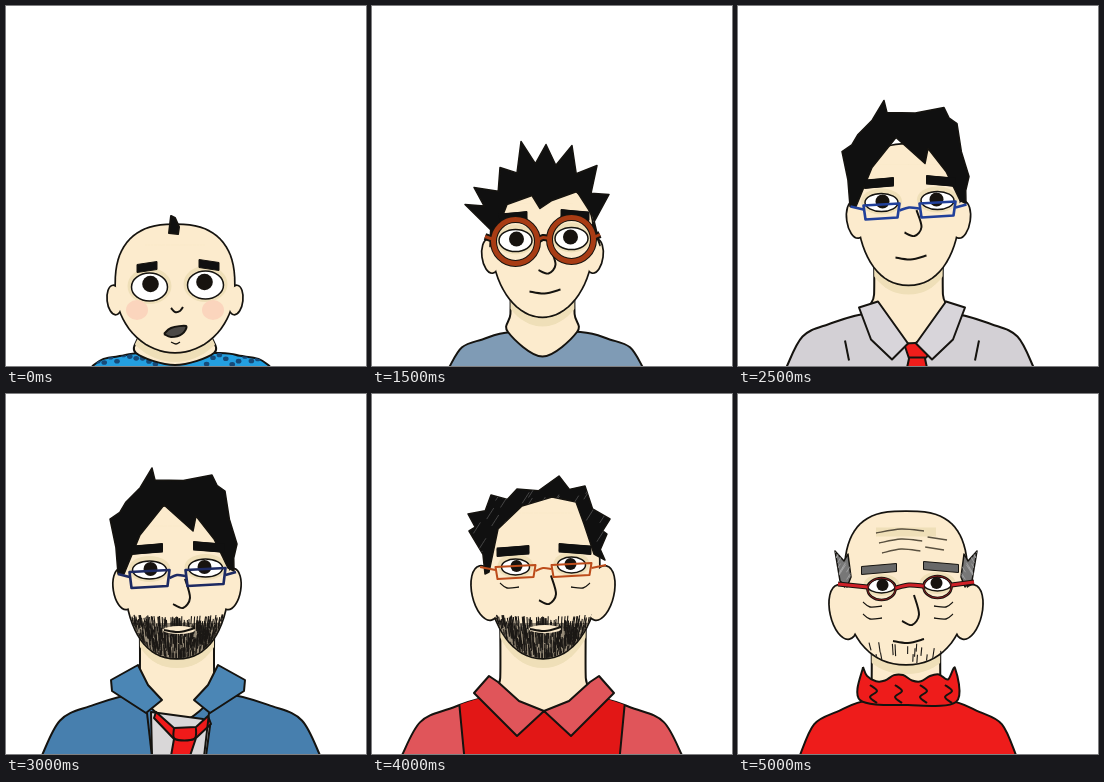
These frames come from a looping animation (360x360 px, 5.5 s). An HTML page with a canvas:

```html
<!DOCTYPE html>
<html lang="en">
<head>
<meta charset="utf-8">
<title>Growing older</title>
<style>
html, body { margin: 0; width: 100%; height: 100%; overflow: hidden; background: #fff; }
canvas { display: block; width: 100vw; height: 100vh; }
</style>
</head>
<body>
<canvas id="stage" width="360" height="360"></canvas>
<script>
const ctx = document.getElementById('stage').getContext('2d');
const INK = '#15130f', SKIN = '#fcebcd', SHADE = '#efdfb8', BLACK = '#101010';
const STEP = 500, SIDES = [-1, 1];

const points = t => typeof t === 'string' ? t.split(' ').map(s => s.split(',').map(Number)) : t;
const lerp = (a, b, t) => a + (b - a) * t;
const rng = seed => () => (seed = seed * 16807 % 2147483647) / 2147483647;

function poly(t, closed = true) {
  const path = new Path2D();
  points(t).forEach(p => path.lineTo(...p));
  if (closed) path.closePath();
  return path;
}

// Smooth open curve through the points
function curve(t) {
  const p = points(t), path = new Path2D();
  const at = i => p[Math.max(0, Math.min(p.length - 1, i))];
  path.moveTo(...p[0]);
  for (let i = 0; i < p.length - 1; i++) {
    const [a, b, c, d] = [at(i - 1), at(i), at(i + 1), at(i + 2)];
    path.bezierCurveTo(b[0] + (c[0] - a[0]) / 6, b[1] + (c[1] - a[1]) / 6,
      c[0] - (d[0] - b[0]) / 6, c[1] - (d[1] - b[1]) / 6, ...c);
  }
  return path;
}

function oval(x, y, rx, ry, turn = 0) {
  const path = new Path2D();
  path.ellipse(x, y, rx, ry, turn, 0, Math.PI * 2);
  return path;
}

function ink(path, color = INK, width = 2) {
  ctx.strokeStyle = color;
  ctx.lineWidth = width;
  ctx.stroke(path);
}

function fill(path, color) {
  ctx.fillStyle = color;
  ctx.fill(path);
}

function paint(path, color, width) {
  fill(path, color);
  ink(path, INK, width);
}

function local(x, y, fn, sx = 1) {
  ctx.save();
  ctx.translate(x, y);
  ctx.scale(sx, 1);
  fn();
  ctx.restore();
}

const mirror = (x, y, fn) => SIDES.forEach(s => local(x, y, fn, s));

function inside(path, fn) {
  ctx.save();
  ctx.clip(path);
  fn();
  ctx.restore();
}

// Head outline: two half superellipses meeting at eye level
function facePath(a) {
  const pts = [];
  for (let i = 0; i < 72; i++) {
    const c = Math.cos(i * Math.PI / 36), s = Math.sin(i * Math.PI / 36);
    const k = 2 / (s < 0 ? a.crown : a.jaw), h = s < 0 ? a.eye - a.top : a.chin - a.eye;
    pts.push([a.cx + a.w * Math.sign(c) * Math.abs(c) ** k, a.eye + h * Math.sign(s) * Math.abs(s) ** k]);
  }
  return poly(pts);
}

function bodyPath(a) {
  const edge = [[a.span, 1.02], [a.span * 0.87, 0.45], [a.span * 0.66, 0.22], [a.neck, 0]];
  const half = s => edge.map(([x, t]) => [a.bx + s * x, lerp(a.base, 360, t)]);
  return curve([...half(-1), ...half(1).reverse()]);
}

function neckPath(a) {
  const side = s => [[0.93, a.chin - 35], [0.93, a.base - 18], [1, a.base]].map(([k, y]) => [a.cx + s * k * a.neck, y]);
  return curve([...side(-1), [a.cx, a.base + a.dip], ...side(1).reverse()]);
}

// Clothes
const tie = a => local(a.bx + 4, a.base, () => {
  paint(poly('-10,31 14,30 18,39 11,46 14,60 -8,60 -5,46'), '#f01d1b');
  ink(curve('-5,45 11,45'));
});

const sleeves = (a, color) => inside(bodyPath(a), () => local(a.bx, 0, () => {
  const x = a.span * 0.61, y = a.span * 0.55;
  paint(poly([[-x, a.base - 20], [x, a.base - 20], [y, 370], [-y, 370]]), color);
}));

const onesie = {
  color: '#239fe0',
  back(a) {
    const r = rng(5);
    inside(bodyPath(a), () => {
      for (let i = 0; i < 28; i++) fill(oval(a.bx + (i - 14) * 6.4, 348 + r() * 11, 2.8, 2.3), '#174a78');
    });
  }
};

const overalls = {
  color: '#416fcb',
  front: a => mirror(a.bx - 2, a.base, () => {
    paint(poly('-63,-3 -47,-5 -46,25 -61,25'), '#f58a1c');
    paint(poly('-64,-3 -48,-5 -47,5 -62,8'), '#f6b021');
  })
};

const plain = { color: '#7f9bb5' };

const shirt = {
  color: '#d3d0d5',
  front(a) {
    tie(a);
    mirror(a.bx + 2, a.base, () => {
      paint(poly('-34,-11 -53,-5 -41,27 -20,47 -4,31'), '#d8d5da');
      ink(curve('-67,28 -63,48'));
    });
  }
};

const jacket = {
  color: '#477fae',
  front(a) {
    paint(poly('145,318 197,325 204,332 200,362 146,362'), '#d9d7d8');
    paint(poly('150,318 168,334 190,333 202,322 205,330 190,344 184,362 165,362 168,345 148,324'), '#f01a1a');
    ink(curve('168,334 169,345 188,345 190,334'));
    mirror(a.bx - 3, a.base, () => {
      paint(poly('-40,-28 -67,-13 -66,-2 -32,20 -16,7 -30,-8'), '#4b86b5');
      ink(curve('-31,20 -26,64'));
    });
  }
};

const polo = (color, trim) => ({
  color: trim,
  back: a => sleeves(a, color),
  front: a => mirror(a.cx + 1, a.base, () => paint(poly('-46,-14 -55,-20 -70,-3 -27,40 0,15 -25,5'), trim))
});

const crew = { color: '#7a3d40', back: a => sleeves(a, '#cf2422') };

const sweater = {
  color: '#ee1c1b',
  front: a => local(a.cx + 2, a.base, () => {
    const rim = [], half = 41;
    for (let x = -half; x <= half; x += 9) rim.push([x, -22 + 4 * Math.sin(x / 6)]);
    paint(curve([[-45, -33], ...rim, [47, -32], [48, 2], [0, 5], [-48, 0], [-45, -33]]), '#ee1c1b');
    for (let x = -36; x < 45; x += 25) {
      ink(curve([0, 1, 2, 3].map(i => [x + (i % 2 ? 5 : -2), -15 + i * 6])));
    }
  })
};

// Hair: valleys between the tips are pulled towards the head
function hairPath({ tips, fringe, cut }) {
  const p = points(tips), out = [];
  p.forEach((tip, i) => {
    out.push(tip);
    const next = p[i + 1];
    if (next) out.push([lerp((tip[0] + next[0]) / 2, 171, cut), lerp((tip[1] + next[1]) / 2, p[0][1], cut)]);
  });
  return poly([...out, ...points(fringe)]);
}

function streaks(path, x, y, w, h, color) {
  const r = rng(31);
  inside(path, () => {
    for (let i = 0; i < 45; i++) {
      const px = x + r() * w, py = y + r() * h;
      ink(curve([[px, py], [px + 7, py - 11]]), color, 0.8);
    }
  });
}

function drawHair(a) {
  const h = a.hair;
  local(0, a.eye - h.eye, () => {
    const path = hairPath(h);
    paint(path, BLACK, 1.5);
    if (h.streak) streaks(path, 95, 85, 145, 85, h.streak);
  });
}

const tufts = (t, color, streak) => a => mirror(a.cx, a.eye, () => {
  const path = poly(t);
  paint(path, color, 1.5);
  streaks(path, -75, -60, 30, 60, streak);
});

const spiky = {
  eye: 251, cut: 0.2,
  tips: '118,258 93,216 102,199 128,179 149,153 174,156 200,157 225,177 237,206 228,257',
  fringe: '221,228 205,203 180,212 168,220 160,207 135,216 122,250'
};
const swept = {
  eye: 216, cut: 0.12,
  tips: '114,222 121,150 161,131 196,130 230,139 244,208',
  fringe: '222,203 200,184 190,176 187,190 168,167 145,183 122,208'
};
const parted = {
  eye: 175, cut: 0.03,
  tips: '112,180 104,125 120,108 146,74 149,86 206,81 219,97 231,150 228,177',
  fringe: '222,174 208,145 190,122 187,137 158,111 134,141 118,180'
};
const ruffled = {
  eye: 172, cut: 0.09, streak: '#555',
  tips: '113,180 97,137 96,120 119,101 145,95 187,82 213,92 238,125 235,140 233,166',
  fringe: '222,160 212,130 204,108 180,103 150,112 126,135 117,178'
};

// Stages of life
const baby = {
  cx: 169, top: 219, chin: 346, w: 59, eye: 280, crown: 2.5, jaw: 2, ear: 14,
  rx: 18, ry: 14, pupil: 8.3, gaze: -3, browLen: 20, browUp: 21, brow: 9, nose: 0, mouth: 327,
  bx: 175, span: 89, neck: 39, base: 347, dip: 12, outfit: onesie, browColor: BLACK,
  extra(a) {
    SIDES.forEach(s => fill(oval(a.cx + s * 38, a.eye + 24, 11, 10), '#fbd5bd'));
    ink(curve('165,302 169,306 174,305 177,301'));
    paint(curve('158,328 165,322 180,320 176,328 165,331 158,328'), '#4c4946');
    ink(curve('165,336 170,338 174,336'), INK, 1.3);
    if (!a.hair) paint(poly('163,227 165,210 169,212 173,221 172,228'), BLACK);
  }
};
const boy = {
  cx: 171, top: 190, chin: 328, w: 51, eye: 251, crown: 2.5, jaw: 1.9, ear: 17,
  rx: 17, ry: 13, pupil: 8, gaze: -2, browLen: 29, browUp: 30, brow: 9, nose: 38, mouth: 304,
  bx: 179, span: 85, neck: 35, base: 338, dip: 14, outfit: overalls, browColor: BLACK, hair: spiky,
  specs: { color: '#a83c14', round: true, w: 22, h: 22, thick: 5, drop: 1 }
};
const young = {
  cx: 170, top: 165, chin: 293, w: 50, eye: 216, crown: 2.5, jaw: 2.1, ear: 16,
  rx: 16, ry: 9, pupil: 7, gaze: -1, browLen: 27, browUp: 19, brow: 9, nose: 30, mouth: 267,
  bx: 169, span: 108, neck: 34, base: 314, dip: 35, outfit: shirt, browColor: BLACK, hair: swept,
  specs: { color: '#21409a', w: 18, h: 7, thick: 2.6, drop: 9 }
};
const man = {
  cx: 171, top: 112, chin: 264, w: 52, eye: 175, crown: 2.5, jaw: 2.3, ear: 20,
  rx: 17, ry: 9, pupil: 7, gaze: -1, browLen: 31, browUp: 22, brow: 9, nose: 39, mouth: 236,
  bx: 175, span: 139, neck: 40, base: 299, dip: 30, outfit: jacket, browColor: BLACK, hair: parted,
  specs: { color: '#1d2a63', w: 20, h: 8, thick: 2.6, drop: 9 },
  beard: { top: 220, half: 50, sag: 2, count: 520, full: true }
};
const middle = {
  cx: 171, top: 99, chin: 264, w: 56, eye: 172, crown: 2.6, jaw: 2.1, ear: 27,
  rx: 14, ry: 8, pupil: 6, gaze: -1, browLen: 32, browUp: 17, brow: 9, nose: 38, mouth: 235,
  bx: 170, span: 140, neck: 46, base: 302, dip: 16, outfit: polo('#e21716', '#e0555a'),
  browColor: BLACK, hair: ruffled, bags: 1,
  specs: { color: '#bd4c1b', w: 20, h: 6, thick: 2, drop: 5 },
  beard: { top: 220, half: 54, sag: 2, count: 520, full: true }
};
const senior = {
  cx: 169, top: 106, chin: 271, w: 55, eye: 183, crown: 3.4, jaw: 2, ear: 28,
  rx: 15, ry: 9, pupil: 6.5, gaze: -1, browLen: 42, browUp: 17, brow: 9, nose: 41, mouth: 241,
  bx: 170, span: 122, neck: 45, base: 301, dip: 20, outfit: crew, browColor: '#252525', bags: 1, folds: 3,
  specs: { color: '#a52c1b', round: true, w: 19, h: 10, thick: 2.2, drop: 3 },
  beard: { top: 245, half: 37, sag: 7, count: 200 },
  extra: tufts('-52,-5 -61,-15 -73,-26 -62,-22 -65,-58 -57,-46 -51,-64 -50,-40 -44,-33 -51,-10', '#2d2d2d', '#777')
};
const elder = {
  cx: 168, top: 118, chin: 270, w: 61, eye: 191, crown: 2.9, jaw: 2.2, ear: 27,
  rx: 14, ry: 7, pupil: 6, gaze: -1, browLen: 35, browUp: 18, brow: 9, nose: 40, mouth: 247,
  bx: 170, span: 108, neck: 37, base: 306, dip: 4, outfit: sweater, browColor: '#686868', bags: 2, folds: 3,
  specs: { color: '#cf2027', round: true, w: 14, h: 11, thick: 0.6, drop: 3, bridge: 3 },
  beard: { top: 246, half: 37, sag: 4, count: 17 },
  extra: tufts('-71,-34 -62,-24 -58,-31 -55,-8 -59,2 -66,-4', '#777', '#aaa')
};

// Halfway between two stages, with a few traits chosen
function between(a, b, traits) {
  const mid = { ...a };
  for (const k in a) if (typeof a[k] === 'number') mid[k] = lerp(a[k], b[k] ?? a[k], 0.5);
  return { ...mid, ...traits };
}

const ages = [
  baby, { ...baby, eye: 283, w: 54, hair: swept },
  boy, between(boy, young, { outfit: plain }),
  young, between(young, man, { hair: parted }),
  man, between(man, middle, { outfit: polo('#4d7f6c', '#6f9f8b') }),
  middle, senior, elder
];

function drawBody(a) {
  const neck = neckPath(a), { color, back, front } = a.outfit;
  paint(bodyPath(a), color);
  if (back) back(a);
  paint(neck, SKIN);
  inside(neck, () => local(0, 10, () => fill(facePath(a), SHADE)));
  if (front) front(a);
}

function drawSkull(a) {
  const face = facePath(a);
  const ears = SIDES.map(s => oval(a.cx + s * (a.w + 1.5), a.eye + a.ear, a.ear * 0.47, a.ear, s * a.ear * 0.008));
  const parts = [face, ...ears];
  parts.forEach(p => ink(p, INK, 3.4));
  parts.forEach(p => fill(p, SKIN));
  inside(face, () => ink(curve(SIDES.map(s => [a.cx + s * 30, a.top + 20])), SHADE, a.folds ? 9 : 0.1));
}

function drawBeard(a) {
  const { top, half, sag, count, full } = a.beard, r = rng(77);
  inside(facePath(a), () => {
    if (full) fill(poly([[0, top + 9], [360, top + 9], [360, 300], [0, 300]]), 'rgba(50,44,36,.5)');
    for (let i = 0; i < count; i++) {
      const u = r() * 2 - 1, x = a.cx + u * half, y0 = top + sag * (1 - u * u);
      const y = lerp(y0, a.chin - 4, r());
      ink(curve([[x, y], [x + u * -2, y + 7 + r() * 5]]), '#1b1815', 1.1);
    }
  });
  if (full) fill(oval(a.cx + 2, a.mouth, 16, 4), SKIN);
}

function drawEye(a, s) {
  const x = 171.5 + s * 28, y = a.eye - s;
  fill(oval(x, y - 1, a.rx + 4, a.ry + 4), SHADE);
  paint(oval(x, y, a.rx, a.ry), '#fff', 1.5);
  fill(oval(x - s, y + a.gaze, a.pupil, a.pupil), '#17130f');
  const bx = 172 + s * 31, by = a.eye - a.browUp - s, h = a.browLen / 2, t = a.brow / 2;
  paint(poly([[bx - s * h, by - t], [bx + s * h, by - t + 3], [bx + s * h, by + t + 2], [bx - s * h, by + t - 1]]), a.browColor, 1);
}

function drawSpecs(a) {
  const { color, round, w, h, thick, drop, bridge = thick } = a.specs;
  const x = s => 171.5 + s * 28, y = s => a.eye + drop - s;
  const lens = s => round ? oval(x(s), y(s), w, h)
    : poly([[x(s) - w, y(s) - h + 1], [x(s) + w, y(s) - h - 1], [x(s) + w - 2, y(s) + h - 1], [x(s) - w + 2, y(s) + h + 1]]);
  const rims = SIDES.map(lens);
  const bars = SIDES.map(s => curve([[x(s) + s * w, y(s) - 2], [a.cx + s * (a.w + 7), y(s) - 5]]));
  bars.push(curve([[x(-1) + w, y(-1) - 1], [171, a.eye + drop - 3], [x(1) - w, y(1) - 1]]));
  if (round) {
    rims.forEach(p => ink(p, INK, thick + 2));
    bars.forEach(p => ink(p, INK, bridge + 2));
  }
  rims.forEach(p => ink(p, color, thick));
  bars.forEach(p => ink(p, color, Math.min(bridge, 3)));
}

function drawWrinkles(a) {
  for (let i = 0; i < (a.bags || 0); i++) {
    mirror(a.cx + 2, a.eye + 19 + i * 12, () => ink(curve('-45,-2 -38,3 -26,2'), INK, 1.3));
  }
  for (let i = 0; i < (a.folds || 0); i++) {
    const y = a.top + 18 + i * 10, h = 30 - i * 3;
    ink(curve([[a.cx - h, y + 3], [a.cx - 5, y - 1], [a.cx + h * 0.6, y + 1]]), '#5a5140', 1.4);
    if (i) ink(curve([[a.cx + h * 0.8, y - 3], [a.cx + h + 14, y]]), '#5a5140', 1.4);
  }
}

function drawHead(a) {
  drawSkull(a);
  if (a.beard) drawBeard(a);
  SIDES.forEach(s => drawEye(a, s));
  if (a.nose) {
    const nose = [[8, 0.25], [13, 0.74], [6, 1], [-4, 0.9]];
    ink(curve(nose.map(([x, t]) => [a.cx + x, a.eye + t * a.nose])));
    ink(curve([[a.cx - 13, a.mouth], [a.cx + 2, a.mouth + 2], [a.cx + 18, a.mouth - 2]]));
  }
  drawWrinkles(a);
  if (a.extra) a.extra(a);
  if (a.hair) drawHair(a);
  if (a.hair) SIDES.forEach(s => drawBrowOver(a, s));
  if (a.specs) drawSpecs(a);
}

// Brows stay visible on top of a low fringe
function drawBrowOver(a, s) {
  const x = 172 + s * 31, y = a.eye - a.browUp - s, h = a.browLen / 2;
  ink(curve([[x - s * h, y], [x + s * h, y + 2]]), a.browColor, a.brow);
}

function render() {
  const a = ages[Math.floor(performance.now() / STEP) % ages.length];
  ctx.fillStyle = '#fff';
  ctx.fillRect(0, 0, 360, 360);
  ctx.lineJoin = 'round';
  drawBody(a);
  drawHead(a);
  requestAnimationFrame(render);
}
render();
</script>
</body>
</html>
```
